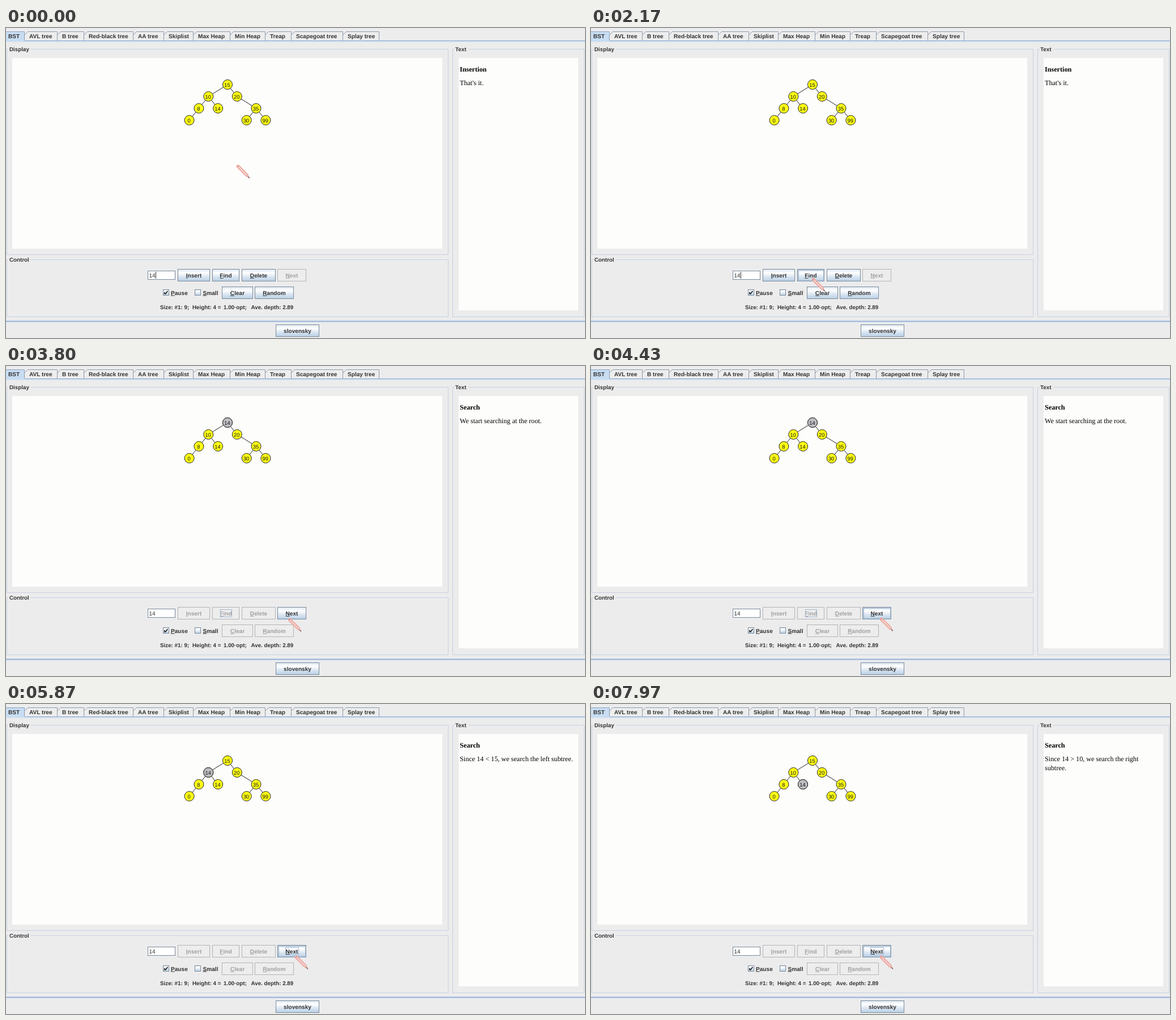
Recreate the animation shown at these times as an HTML page. Size 1022 by 548 pixels, loop 8000 ms.

```html
<!DOCTYPE html>
<html lang="en">
<head>
<meta charset="utf-8">
<title>Binary search tree</title>
<style>
html, body { margin: 0; width: 100%; height: 100%; overflow: hidden; background: #ececed; }
svg { display: block; width: 100vw; height: 100vh; }
text { font: bold 10.1px "Liberation Sans", Arial, sans-serif; fill: #333; white-space: pre; text-rendering: geometricPrecision; }
.mid { text-anchor: middle; }
.key { text-decoration: underline; }
.plain { font-weight: normal; }
.num { font-weight: normal; font-size: 9.4px; fill: #111; text-anchor: middle; }
.serif { font: 12.15px "Liberation Serif", Times, serif; fill: #000; }
.serif.head { font-weight: bold; }
#panels text, #stats text { font-size: 9.8px; }
.panel { fill: none; stroke: #c6d0de; }
.paper { fill: #fdfdfc; }
.field { fill: #fff; stroke: #7a8a99; }
.on rect { fill: url(#ocean); stroke: #7a8a99; }
.off rect { fill: #ededed; stroke: #b3b4b8; }
.off text { fill: #a0a0a2; }
.hover { fill: none; stroke: #9db6cd; stroke-width: 1.4; }
.focus { fill: none; stroke: #a5b8d2; }
.edge { stroke: #222; }
.node circle { fill: #ffff14; stroke: #222; }
#probe circle { fill: #bfbfc3; }

.idle, .busy, .search, #caret, #findHover, #findFocus, #nextHover, #nextFocus, #toRoot, #toLeft, #toRight {
  animation: 8s step-end infinite;
}
.idle { animation-name: idle; }
.busy, .search { animation-name: busy; }
#caret { animation-name: caret; }
#findHover { animation-name: findHover; }
#findFocus, #toRoot { animation-name: firstStep; }
#nextHover { animation-name: nextHover; }
#nextFocus { animation-name: nextFocus; }
#toLeft { animation-name: secondStep; }
#toRight { animation-name: thirdStep; }
#probe { animation: probe 8s steps(10) infinite; }
#pencil { animation: pencil 8s ease-in-out infinite; }

@keyframes idle { 0% { opacity: 1 } 32.375%, 100% { opacity: 0 } }
@keyframes busy { 0% { opacity: 0 } 32.375%, 100% { opacity: 1 } }
@keyframes caret {
  0%, 10.6%, 23.1% { opacity: 1 }
  4.4%, 16.9%, 29.4%, 100% { opacity: 0 }
}
@keyframes findHover { 0% { opacity: 0 } 20.6% { opacity: 1 } 32.375%, 100% { opacity: 0 } }
@keyframes firstStep { 0% { opacity: 0 } 32.375% { opacity: 1 } 60.4%, 100% { opacity: 0 } }
@keyframes nextHover { 0% { opacity: 0 } 48.5%, 100% { opacity: 1 } }
@keyframes nextFocus { 0% { opacity: 0 } 60.4%, 100% { opacity: 1 } }
@keyframes secondStep { 0% { opacity: 0 } 60.4% { opacity: 1 } 86%, 100% { opacity: 0 } }
@keyframes thirdStep { 0% { opacity: 0 } 86%, 100% { opacity: 1 } }
@keyframes probe {
  0%, 32.375% { transform: translate(11px, 40px) }
  39.625%, 60.625% { transform: translate(391px, 100px) }
  67.875%, 86.25% { transform: translate(357.3px, 121px) }
  93.5%, 100% { transform: translate(374px, 142px) }
}
@keyframes pencil {
  0%, 1% { transform: translate(407px, 242px) }
  10%, 18.5% { transform: translate(392px, 451px) }
  21%, 33% { transform: translate(390px, 442px) }
  35%, 39.3% { transform: translate(390px, 443px); animation-timing-function: ease-in }
  41.8% { transform: translate(420px, 452px); animation-timing-function: ease-out }
  50%, 100% { transform: translate(510px, 445px) }
}
</style>
</head>
<body>
<svg viewBox="0 0 1022 548" preserveAspectRatio="none">
  <defs>
    <linearGradient id="ocean" x2="0" y2="1">
      <stop stop-color="#dde8f3"/><stop offset=".3" stop-color="#fff"/>
      <stop offset=".6" stop-color="#dde8f3"/><stop offset="1" stop-color="#b8cfe5"/>
    </linearGradient>
    <clipPath id="canvas"><rect x="11" y="53" width="759" height="337"/></clipPath>
  </defs>

  <g id="tabs">
    <path d="M0 23.5H1022" stroke="#c8ddf2" stroke-width="2"/>
    <path d="M33 22.5H1022" stroke="#8fa8cd"/>
    <path d="M0 6.5H32.5V24H0Z" fill="#c8ddf2"/>
    <path d="M0 6.5H32.5V22" fill="none" stroke="#8ba3c4"/>
  </g>
  <g id="panels"></g>
  <rect class="paper" x="11" y="53" width="759" height="337"/>
  <rect class="paper" x="799" y="53" width="211" height="446"/>
  <path d="M0 518.5H1022" stroke="#7f9fcf" stroke-width="1.6"/>
  <path d="M0 520H1022" stroke="#c8ddf2"/>

  <g clip-path="url(#canvas)">
    <g id="tree"></g>
    <g id="probe" class="node"><circle r="8.5"/><text class="num" x="-.6" y="3.6">14</text></g>
  </g>

  <g>
    <g class="idle">
      <text class="serif head" x="801" y="77">Insertion</text>
      <text class="serif" x="801" y="101">That's it.</text>
    </g>
    <text class="serif head search" x="801" y="77">Search</text>
    <text class="serif" id="toRoot" x="801" y="101">We start searching at the root.</text>
    <text class="serif" id="toLeft" x="801" y="101">Since 14 &lt; 15, we search the left subtree.</text>
    <g id="toRight">
      <text class="serif" x="801" y="101">Since 14 &gt; 10, we search the right</text>
      <text class="serif" x="801" y="117">subtree.</text>
    </g>
  </g>

  <rect class="field" x="250.5" y="429.5" width="48" height="15"/>
  <text class="plain" x="252.5" y="441">14</text>
  <path id="caret" d="M264.5 431V443" stroke="#333"/>
  <g id="buttons"></g>
  <rect id="findHover" class="hover" x="366.2" y="428.2" width="44.6" height="18.6"/>
  <rect id="nextHover" class="hover" x="481.2" y="428.2" width="47.6" height="18.6"/>
  <rect id="findFocus" class="focus" x="378.5" y="430.5" width="20" height="13"/>
  <rect id="nextFocus" class="focus" x="493.5" y="430.5" width="23" height="13"/>

  <g fill="url(#ocean)" stroke="#7a8a99">
    <rect x="277.5" y="462.5" width="10" height="10"/>
    <rect x="333.5" y="462.5" width="10" height="10"/>
  </g>
  <path d="M280 467V470.5M281 470.5L285.5 465" fill="none" stroke="#222" stroke-width="1.8"/>
  <text x="291" y="471.5"><tspan class="key">P</tspan>ause</text>
  <text x="347.5" y="471.5"><tspan class="key">S</tspan>mall</text>
  <g id="stats">
    <text x="272" y="497.3">Size: #1: 9;</text>
    <text x="329" y="497.3">Height: 4 =</text>
    <text x="384" y="497.3">1.00·opt;</text>
    <text x="432.5" y="497.3">Ave. depth: 2.89</text>
  </g>

  <g id="pencil" stroke-linecap="round">
    <path d="M3 3L18 18" stroke="#f7c3bd" stroke-width="7" opacity=".5"/>
    <path d="M2.5 2.5L18 18" stroke="#e69a93" stroke-width="4.6"/>
    <path d="M3.5 3.5L18 18" stroke="#f8dad6" stroke-width="2"/>
    <path d="M16.5 20L20 16.5L23 23.5Z" fill="#e5b3aa"/>
    <path d="M20.5 21L22.5 23" stroke="#8a544e" stroke-width="1.5"/>
  </g>
</svg>
<script>
const add = (id, markup) => document.getElementById(id).insertAdjacentHTML('beforeend', markup);

const tabs = [['AVL tree', 33], ['B tree', 91], ['Red-black tree', 138], ['AA tree', 225],
  ['Skiplist', 279], ['Max Heap', 331], ['Min Heap', 396], ['Treap', 458],
  ['Scapegoat tree', 504], ['Splay tree', 595], ['', 659]];
add('tabs', '<text x="4" y="18">BST</text>');
tabs.slice(0, -1).forEach(([label, x], i) => {
  const right = tabs[i + 1][1] - .5;
  add('tabs', `<path d="M${x - .5} 22V12.5L${x + 5.5} 6.5H${right}V22" fill="#ededed" stroke="#8d99a8"/>
    <text x="${x + 8}" y="18">${label}</text>`);
});

function panel(label, x, y, right, bottom, gap) {
  add('panels', `<path class="panel" d="M${x + 3} ${y}H${x}V${bottom}H${right}V${y}H${x + gap}"/>
    <text x="${x + 4.5}" y="${y + 3.2}">${label}</text>`);
}
panel('Display', 1.5, 37.5, 780.5, 400.5, 42);
panel('Control', 1.5, 409.5, 780.5, 510.5, 42);
panel('Text', 788.5, 37.5, 1020.5, 510.5, 28);

function button(label, x, y, width, state, mnemonic = true) {
  const caption = mnemonic ? `<tspan class="key">${label[0]}</tspan>${label.slice(1)}` : label;
  add('buttons', `<g class="${state}"><rect x="${x + .5}" y="${y + .5}" width="${width}" height="21"/>
    <text class="mid" x="${x + width / 2 + .5}" y="${y + 14.8}">${caption}</text></g>`);
}
[['Insert', 303, 426, 56], ['Find', 364, 426, 47], ['Delete', 416, 426, 59],
 ['Clear', 381, 457, 54], ['Random', 439, 457, 68]].forEach(spec => {
  button(...spec, 'on idle');
  button(...spec, 'off busy');
});
button('Next', 479, 426, 50, 'off idle');
button('Next', 479, 426, 50, 'on busy');
button('slovensky', 476, 524, 76, 'on', false);

// value, column, depth, index of the parent
const nodes = [[15, 0, 0], [10, -2, 1, 0], [20, 1, 1, 0], [8, -3, 2, 1], [14, -1, 2, 1],
  [35, 3, 2, 2], [0, -4, 3, 3], [30, 2, 3, 5], [99, 4, 3, 5]];
const place = ([, column, depth]) => [391 + 16.85 * column, 100 + 21 * depth];
for (const node of nodes.slice(1))
  add('tree', `<path class="edge" d="M${place(node)}L${place(nodes[node[3]])}"/>`);
for (const node of nodes)
  add('tree', `<g class="node" transform="translate(${place(node)})"><circle r="8.5"/>
    <text class="num" x="-.6" y="3.6">${node[0]}</text></g>`);
</script>
</body>
</html>
```
